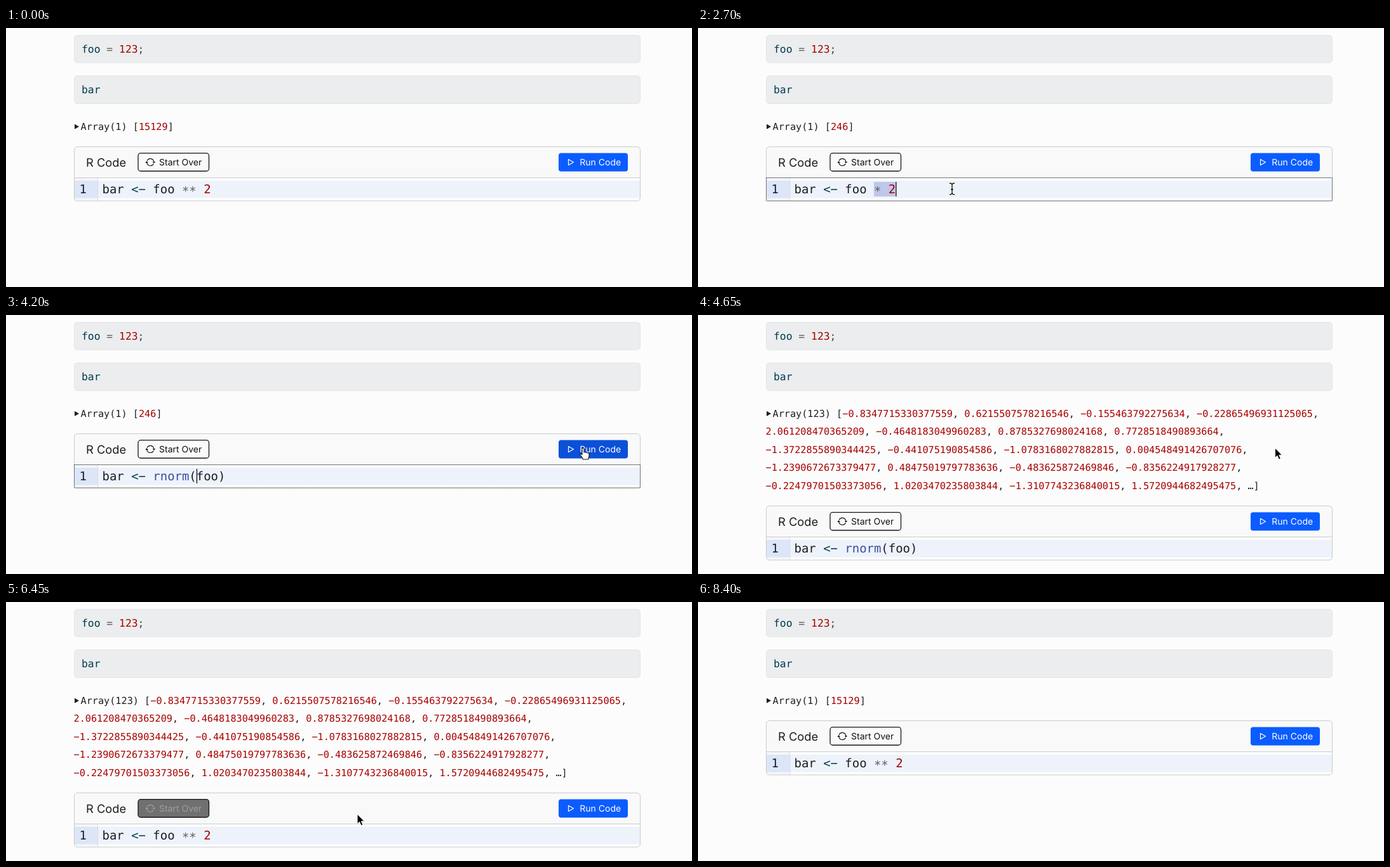
Write an HTML page that moves like this. It is 1080 px wide and 409 px high and loops after 8450 ms.

```html
<!DOCTYPE html>
<html lang="en">
<head>
<meta charset="utf-8">
<title>Live R cell</title>
<style>
html, body { margin: 0; width: 100%; height: 100%; overflow: hidden; background: #fcfcfc; }
svg { display: block; width: 100vw; height: 100vh; }
text { white-space: pre; text-rendering: geometricPrecision; }
.mono { font-family: "DejaVu Sans Mono", "Liberation Mono", monospace; }
.ui { font-family: Inter, "Open Sans", sans-serif; font-size: 14px; }
.cell { font-size: 16.35px; }
.out { font-size: 15.2px; }
.code { font-size: 18.95px; }
.name { fill: #003b4f; }
.op { fill: #5e5e5e; }
.num { fill: #a80000; }
.call { fill: #3a4d9f; }
.plain { fill: #1b1e22; }
</style>
</head>
<body>
<svg id="stage" viewBox="0 0 1080 409" preserveAspectRatio="xMinYMin meet">
  <g fill="#ebedee" stroke="#e3e5e6">
    <rect x="107.5" y="11.5" width="891" height="43.5" rx="5"/>
    <rect x="107.5" y="75.5" width="891" height="44" rx="5"/>
  </g>
  <text class="mono cell name" x="119" y="39">foo <tspan class="op">=</tspan> <tspan class="num">123</tspan><tspan fill="#3c4548">;</tspan></text>
  <text class="mono cell name" x="119" y="103">bar</text>

  <path d="M108 151.7L115 155.7L108 159.7Z" fill="#1b1e22"/>
  <g id="output" class="mono out"></g>

  <g id="card">
    <path d="M107.5 236.5V192.500a5 5 0 0 1 5-5H993.500a5 5 0 0 1 5 5V236.500Z" fill="#f9f9f9"/>
    <rect x="108" y="237" width="890" height="36" fill="#fdfdfd"/>
    <rect x="108" y="237" width="36" height="36" fill="#f6f6f7"/>
    <rect x="108" y="241" width="36" height="27.500" fill="#dce6f8"/>
    <rect x="144" y="241" width="854" height="27.500" fill="#edf2fb"/>
    <path d="M144.500 237V273" stroke="#d9dcdf"/>
    <path d="M107.500 236.500H998.500" stroke="#c8cacc"/>
    <rect x="107.500" y="187.500" width="891" height="85.500" rx="5" fill="none" stroke="#c8cacc"/>
    <rect id="focus" x="107.500" y="236.500" width="891" height="36.500" fill="none" stroke="#1c1c1c" stroke-dasharray="1 1"/>

    <text class="ui plain" style="font-size:18.300px" x="126" y="218.500">R Code</text>

    <g id="reset">
      <rect x="208" y="197.700" width="111.500" height="28.300" rx="4" stroke="#161616" stroke-width="1.300"/>
      <g transform="translate(219 203.700) scale(1.03)">
        <path d="M3 5.700A5.500 5.500 0 0 1 13.300 6.800M13 10.300A5.500 5.500 0 0 1 2.700 9.200" fill="none" stroke="currentColor" stroke-width="1.100"/>
        <path d="M11.300 7H15.700L13.500 9.800ZM.300 9H4.700L2.500 6.200Z" fill="currentColor"/>
      </g>
      <text class="ui" x="241" y="217" fill="currentColor">Start Over</text>
    </g>

    <rect id="run" x="870" y="197.500" width="109" height="29" rx="4"/>
    <path d="M885.500 207.500V216.500L893.500 212Z" fill="none" stroke="#fff" stroke-width="1.200" stroke-linejoin="round"/>
    <text class="ui" x="903.300" y="217" fill="#fff">Run Code</text>

    <text class="mono code" x="115.500" y="261" fill="#14202c">1</text>
    <rect id="selection" y="243" height="23" fill="#bfc7ea"/>
    <text id="code" class="mono code" x="151.500" y="261"></text>
    <rect id="caret" y="243" width="1.300" height="23" fill="#111"/>
    <g id="popup" class="mono code"></g>
  </g>

  <g id="pointer">
    <path id="arrow" d="M0 0V15.500L3.600 12.200L6 18L8.800 16.800L6.300 11.200H11Z" fill="#000" stroke="#fff" stroke-width="1"/>
    <g id="ibeam" fill="none">
      <path d="M-4-9Q0-9 0-6V6Q0 9-4 9M4-9Q0-9 0-6V6Q0 9 4 9M-2 1H2" stroke="#fff" stroke-width="3"/>
      <path d="M-4-9Q0-9 0-6V6Q0 9-4 9M4-9Q0-9 0-6V6Q0 9 4 9M-2 1H2" stroke="#111" stroke-width="1.400"/>
    </g>
    <path id="hand" d="M-1.500 1Q0-1 1.500 1V7Q3 5.500 4.300 7.200Q6 6 7 8Q9 7 9.500 9V13Q9 15 8 18H0Q-1 15-5 10Q-4 8-1.500 10.500Z" fill="#fff" stroke="#111" stroke-width="1.100" stroke-linejoin="round"/>
  </g>
</svg>
<script>
const LOOP = 8450, TEXT_X = 151.5, CHAR = 18.95 * 0.60205, GROW = 114;
const $ = id => document.getElementById(id);

function make(parent, tag, attrs, text = '') {
  const el = document.createElementNS('http://www.w3.org/2000/svg', tag);
  for (const key in attrs) el.setAttribute(key, attrs[key]);
  el.textContent = text;
  return parent.appendChild(el);
}
const show = (id, on) => $(id).setAttribute('display', on ? 'inline' : 'none');
const within = (t, a, b) => t >= a && t < b;
const clamp = (v, a, b) => Math.max(a, Math.min(b, v));
const column = i => TEXT_X + i * CHAR;

// time, expression after "bar <- ", caret column (-1 = none)
const edits = [
  [0, 'foo ** 2', -1], [650, 'foo ** 2', 13], [950, 'foo * 2', 12], [1330, 'foo * 2', -1],
  [2420, 'foo * 2', 11], [2850, 'foo ', 11], [2950, 'foo', 10], [3050, 'foo)', 11],
  [3200, 'foo)', 7], [3330, 'rfoo)', 8], [3450, 'rnfoo)', 9], [3580, 'rnofoo)', 10],
  [3700, 'rnorfoo)', 11], [3780, 'rnormfoo)', 12], [3880, 'rnorm(foo)', 13],
  [4350, 'rnorm(foo)', -1], [6100, 'foo ** 2', -1]
];

// time, x, y
const path = [
  [300, 420, 430], [600, 300, 255], [1150, 300, 255], [1340, 1001, 227], [1400, 980, 214],
  [1500, 925, 211], [2000, 925, 211], [2250, 420, 282], [2400, 278, 255], [2450, 278, 255],
  [2650, 400, 254], [3950, 400, 254], [4200, 908.5, 210], [5000, 908.5, 210], [5300, 620, 362],
  [5600, 330, 395], [5900, 265, 326], [6370, 265, 326], [6450, 553, 335], [6650, 910, 327],
  [7150, 910, 327], [7500, 915, 348], [7600, 915, 348]
];
const hiddenWhileTyping = [[800, 1150], [2850, 3950]];

const samples = [
  ['-0.8347715330377559', '0.6215507578216546', '-0.155463792275634', '-0.22865496931125065'],
  ['2.061208470365209', '-0.4648183049960283', '0.8785327698024168', '0.7728518490893664'],
  ['-1.3722855890344425', '-0.441075190854586', '-1.0783168027882815', '0.004548491426707076'],
  ['-1.2390672673379477', '0.48475019797783636', '-0.483625872469846', '-0.8356224917928277'],
  ['-0.22479701503373056', '1.0203470235803844', '-1.3107743236840015', '1.5720944682495475']
];
const functions = ['range(', 'rank(', 'rapply(', 'raw(', 'rbind(', 'rnbinom(', 'rnorm('];

// Runs fn only when the key of that part has changed.
const last = {};
function onChange(part, key, fn) {
  if (last[part] !== key) { last[part] = key; fn(); }
}

function drawOutput(result) {
  const box = $('output');
  box.textContent = '';
  const rows = result === 'list' ? samples : [[result]];
  rows.forEach((row, r) => {
    const line = make(box, 'text', { x: r ? 106.5 : 117.5, y: 160.5 + 28.5 * r, class: 'plain' });
    const end = r === rows.length - 1;
    if (!r) make(line, 'tspan', {}, rows.length > 1 ? 'Array(123) [' : 'Array(1) [');
    row.forEach((n, i) => {
      make(line, 'tspan', { class: 'num' }, n.replace('-', '\u2212'));
      if (!end || i < row.length - 1) make(line, 'tspan', {}, ', ');
    });
    if (end) make(line, 'tspan', {}, rows.length > 1 ? ', …]' : ']');
  });
}

function drawCode(expr) {
  const line = $('code');
  line.textContent = '';
  let lowered = false;
  for (const part of ('bar <- ' + expr).match(/<-|\*+|\d+|\w+|\s+|[()]/g)) {
    const star = part[0] === '*';
    const kind = part === '<-' ? 'name' : star ? 'op' : /^\d/.test(part) ? 'num'
      : expr.startsWith(part + '(') ? 'call' : 'plain';
    make(line, 'tspan', { class: kind, dy: star ? 3 : lowered ? -3 : 0 }, part.replace('-', '\u2212'));
    lowered = star;
  }
}

function drawPopup(prefix) {
  const box = $('popup');
  box.textContent = '';
  if (!prefix) return;
  const items = functions.filter(f => f.startsWith(prefix));
  make(box, 'rect', { x: 232.5, y: 266.5, width: 280, height: 25.7 * items.length, fill: '#f5f5f5', stroke: '#b9bcc0' });
  make(box, 'rect', { x: 233, y: 267, width: 279, height: 25, fill: '#1067c2' });
  items.forEach((item, i) => {
    const line = make(box, 'text', { x: 260, y: 285.5 + 25.7 * i, fill: i ? '#1b1e22' : '#fff' });
    make(line, 'tspan', { 'text-decoration': 'underline' }, prefix);
    make(line, 'tspan', {}, item.slice(prefix.length));
  });
}

function pointerAt(t) {
  const i = path.findIndex(p => p[0] > t);
  if (i < 1 || hiddenWhileTyping.some(([a, b]) => within(t, a, b))) return null;
  const [a, b] = [path[i - 1], path[i]];
  const k = (t - a[0]) / (b[0] - a[0]), e = k * k * (3 - 2 * k);
  return { x: a[1] + (b[1] - a[1]) * e, y: a[2] + (b[2] - a[2]) * e };
}

const gray = (from, to, k) => {
  const v = Math.round(from + (to - from) * k);
  return `rgb(${v},${v},${v})`;
};

function render(t) {
  const result = within(t, 1700, 4450) ? '246' : within(t, 4450, 6900) ? 'list' : '15129';
  const shift = result === 'list' ? GROW : 0;
  onChange('output', result, () => drawOutput(result));
  $('card').setAttribute('transform', `translate(0 ${shift})`);

  let [, expr, caret] = edits.filter(e => e[0] <= t).pop();
  onChange('code', expr, () => drawCode(expr));
  const typed = within(t, 3330, 3880) ? expr.slice(0, caret - 7) : '';
  onChange('popup', typed, () => drawPopup(typed));
  show('focus', within(t, 650, 1600) || within(t, 2420, 4350));

  const p = pointerAt(t);
  const dragging = within(t, 2420, 2850);
  if (dragging) {
    caret = clamp(Math.round((p.x - TEXT_X) / CHAR), 11, 14);
    $('selection').setAttribute('x', column(11));
    $('selection').setAttribute('width', (caret - 11) * CHAR);
  }
  show('selection', dragging);
  show('caret', caret >= 0);
  $('caret').setAttribute('x', column(caret));

  const hover = Math.min(clamp((t - 5870) / 125, 0, 1), clamp((6525 - t) / 125, 0, 1));
  $('reset').setAttribute('fill', gray(250, 17, hover));
  $('reset').setAttribute('color', gray(17, 255, hover));

  show('pointer', !!p);
  let overRun = false;
  if (p) {
    const y = p.y - shift;
    const onRow = within(y, 197, 227);
    overRun = onRow && within(p.x, 870, 979);
    const overButton = overRun || (onRow && within(p.x, 208, 320));
    const overCode = within(y, 237, 273) && within(p.x, 145, 998);
    show('hand', overButton);
    show('ibeam', overCode);
    show('arrow', !overButton && !overCode);
    $('pointer').setAttribute('transform', `translate(${p.x} ${p.y})`);
  }
  $('run').setAttribute('fill', overRun ? '#0b50d9' : '#0b5cff');
}

const start = performance.now();
function tick() {
  render((performance.now() - start) % LOOP);
  requestAnimationFrame(tick);
}
tick();
</script>
</body>
</html>
```
